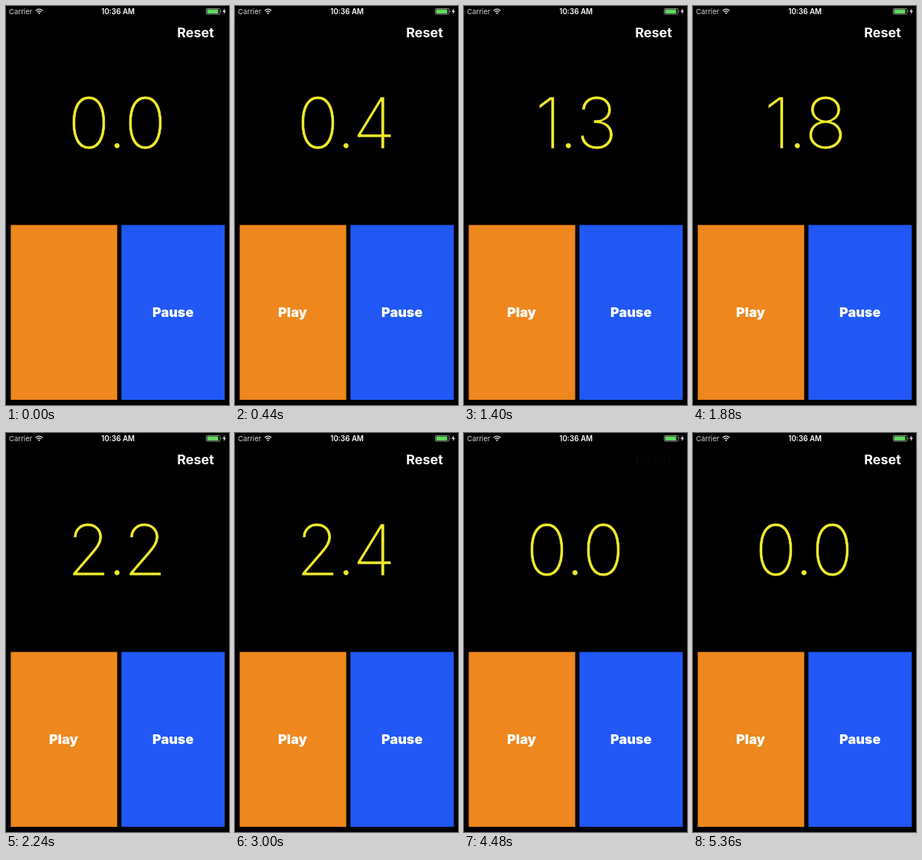
An HTML page for the animation above (5.4 s loop, 300 by 535 pixels).

```html
<!DOCTYPE html>
<html lang="en">
<head>
<meta charset="utf-8">
<title>Stopwatch</title>
<style>
  html, body { margin: 0; width: 100%; height: 100%; overflow: hidden; background: #000; }
  svg { display: block; width: 300px; height: 535px; }
  text { font-family: Inter, "Open Sans", sans-serif; fill: #fff; }
  .mid { text-anchor: middle; }
  .status { font-size: 9.6px; }
  .label { font-size: 18px; font-weight: 900; }
  #clock { font-size: 9.8px; font-weight: 600; }
  #reset { font-weight: 650; }
  /* The black outline trims the strokes slightly. */
  #count { font-size: 95px; font-weight: 200; fill: #efeb2c; stroke: #000; stroke-width: .6px; }
</style>
</head>
<body>
<svg viewBox="0 0 300 535">
  <rect width="300" height="535"/>

  <text class="status" x="4" y="10.8" style="fill:#d6d6d6">Carrier</text>
  <g fill="none" stroke="#e4e4e4" stroke-width="1.3">
    <path d="M39.9 6.3Q44.5 1.9 49.1 6.3"/>
    <path d="M41.6 8.1Q44.5 5.3 47.4 8.1"/>
  </g>
  <path d="M42.9 9.3Q44.5 8 46.1 9.3L44.5 11Z" fill="#e4e4e4"/>
  <text class="mid" id="clock" x="150.7" y="10.8">10:36 AM</text>
  <rect x="269.4" y="3.4" width="18.6" height="7.6" rx="1.4" fill="none" stroke="#b4b4b4" stroke-width=".8"/>
  <rect x="270.6" y="4.5" width="15" height="5.4" rx=".6" fill="#62d860"/>
  <path d="M288.9 5.7Q290.2 7.2 288.9 8.7Z" fill="#b4b4b4"/>
  <path d="M294.6 3L291.3 7.7H293.4L292.7 11.2L296 6.5H293.9Z" fill="#e8e8e8"/>

  <text class="label mid" id="reset" x="255" y="42">Reset</text>
  <text class="mid" id="count" y="190.5"></text>

  <rect x="6.4" y="293.6" width="143.2" height="234.5" fill="#ee871d"/>
  <rect x="155.3" y="293.6" width="139" height="234.5" fill="#2158f5"/>
  <text class="label mid" id="play" x="77.5" y="417">Play</text>
  <text class="label mid" id="pause" x="224.7" y="417">Pause</text>
</svg>
<script>
  const LOOP = 5400, START = 20, STOP = 2440, CLEAR = 4440, FADE = 470;
  const $ = id => document.getElementById(id);
  const count = $('count');

  // Each label vanishes on touch and fades back after release.
  const taps = [
    { el: $('play'), down: 0, up: 40 },
    { el: $('pause'), down: 2340, up: STOP },
    { el: $('reset'), down: 4340, up: CLEAR }
  ];

  const ctx = document.createElement('canvas').getContext('2d');
  const style = getComputedStyle(count);
  ctx.font = `${style.fontWeight} ${style.fontSize} ${style.fontFamily}`;
  ctx.textAlign = 'center';

  // Distance from a glyph's anchor to the middle of its ink.
  function inkShift(glyph) {
    const m = ctx.measureText(glyph);
    return (m.actualBoundingBoxRight - m.actualBoundingBoxLeft) / 2;
  }

  // Distance from the dot to a digit's middle; the 1 is narrow.
  const reach = digit => digit === '1' ? 29 : 38;

  function showCount(value) {
    const [whole, dot, tenth] = value;
    const left = reach(whole), right = reach(tenth);
    const x = 149.3 + left - right;
    const centres = [x - left, x, x + right];
    count.setAttribute('x', centres.map((c, i) => c - inkShift(value[i])).join(' '));
    count.textContent = value;
  }

  function seconds(t) {
    if (t < START || t >= CLEAR) return '0.0';
    return (Math.floor((Math.min(t, STOP) - START) / 100) / 10).toFixed(1);
  }

  function opacity(t, { down, up }) {
    if (t < down) return 1;
    const p = Math.min(1, Math.max(0, (t - up) / FADE));
    return p * p * (3 - 2 * p);
  }

  function draw() {
    const t = performance.now() % LOOP;
    const value = seconds(t);
    if (count.textContent !== value) showCount(value);
    for (const tap of taps) tap.el.style.opacity = opacity(t, tap);
    requestAnimationFrame(draw);
  }

  draw();
</script>
</body>
</html>
```
